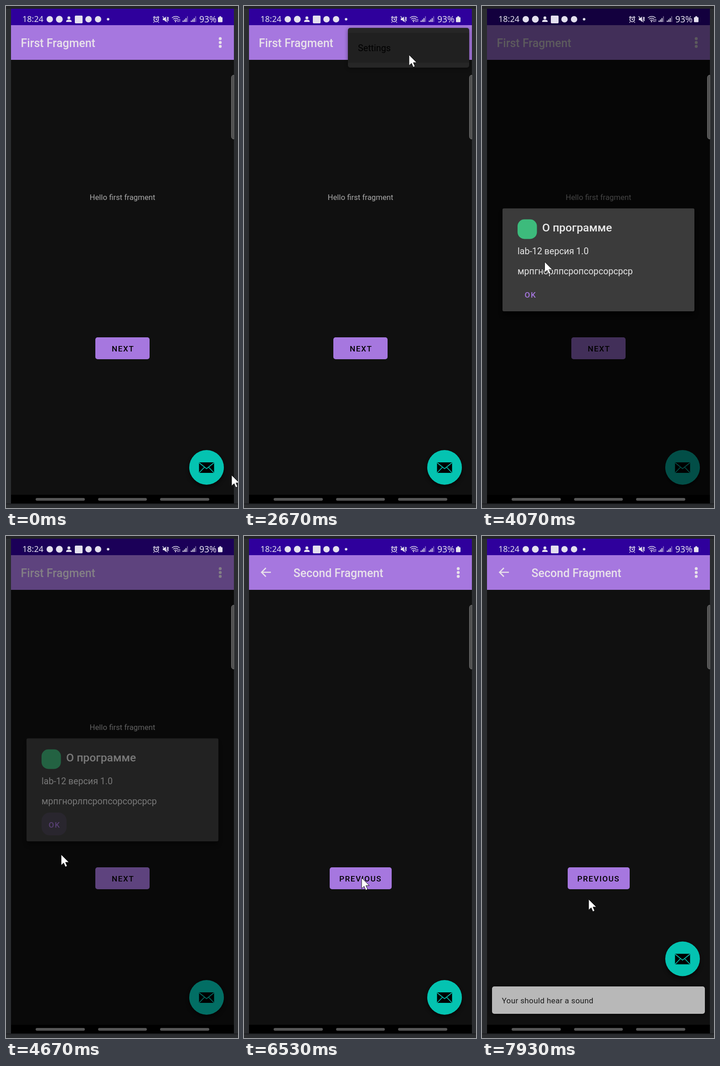
An HTML page that plays this animation: 509x1100 px, repeating every 8 s.

```html
<!DOCTYPE html>
<html lang="en">
<head>
<meta charset="utf-8">
<style>
html, body { margin: 0; width: 100%; height: 100%; overflow: hidden; background: #2b2d30; }
svg { display: block; width: 509px; height: 1100px; font-family: Roboto, sans-serif; }
.bold { font-weight: 500; }
.caps { font-weight: 500; font-size: 17.2px; letter-spacing: .089em; }
.title { font-weight: 500; font-size: 25px; fill: #e8e1ea; }
.body { font-size: 19.65px; fill: #e6e6e6; }
.clock { font-family: "Noto Sans", sans-serif; font-size: 18px; }
</style>
</head>
<body>
<svg viewBox="0 0 509 1100">
  <defs>
    <filter id="soft" x="-30%" y="-30%" width="160%" height="170%"><feGaussianBlur stdDeviation="4"/></filter>
    <clipPath id="fabClip"><circle cx="440" cy="1011" r="38"/></clipPath>
    <clipPath id="nextClip"><rect x="196" y="726" width="119" height="48" rx="5"/></clipPath>
  </defs>
  <rect width="509" height="1100" fill="#2b2d30"/>
  <rect width="509" height="6" fill="#232427"/>
  <rect y="1090" width="509" height="2" fill="#1e1f22"/>
  <rect x="11" y="6" width="489" height="1084" fill="#101010"/>
  <rect x="11" y="6" width="489" height="36" fill="#2f009c"/>
  <rect x="11" y="42" width="489" height="76" fill="#a677df"/>

  <g id="first">
    <text class="title" x="32.5" y="89.500">First Fragment</text>
    <text x="255.500" y="425" text-anchor="middle" font-size="16.800" fill="#a9a9a9">Hello first fragment</text>
    <rect x="196" y="726" width="119" height="48" rx="5" fill="#a677df"/>
    <circle id="nextRipple" cx="258" cy="749" r="0" fill="#000" opacity=".14" clip-path="url(#nextClip)"/>
    <text class="caps" x="232" y="756.500">NEXT</text>
  </g>
  <g id="second">
    <path id="back" d="M59 79.500H39M48 70l-9.500 9.500 9.500 9.500" fill="none" stroke="#e8e1ea" stroke-width="2.600"/>
    <text class="title" x="108.500" y="89.500">Second Fragment</text>
    <rect x="188" y="726" width="136" height="48" rx="5" fill="#a677df"/>
    <text class="caps" x="209" y="756.500">PREVIOUS</text>
  </g>
  <g fill="#e8e1ea">
    <circle cx="470" cy="71.500" r="3.200"/><circle cx="470" cy="80" r="3.200"/><circle cx="470" cy="88.500" r="3.200"/>
  </g>
  <circle id="dotsRipple" cx="469.500" cy="77.500" r="25" fill="#fff"/>

  <g id="snack">
    <rect x="22" y="990" width="467" height="60" rx="5" opacity=".5" filter="url(#soft)"/>
    <rect x="22" y="987" width="467" height="60" rx="5" fill="#b8b8b8"/>
    <text x="43.500" y="1024" font-size="17.200" letter-spacing=".3" fill="#1c1c1c">Your should hear a sound</text>
  </g>
  <g id="fab">
    <circle cx="440" cy="1016" r="38" opacity=".6" filter="url(#soft)"/>
    <circle cx="440" cy="1011" r="38" fill="#04c3b1"/>
    <circle id="fabRipple" cx="440" cy="1011" r="0" fill="#fff" opacity=".22" clip-path="url(#fabClip)"/>
    <rect x="423.500" y="1000" width="33" height="23" rx="1"/>
    <path d="M424 1001l16 13 16-13M424 1022.500l11.500-12M456 1022.500l-11.500-12" fill="none" stroke="#04c3b1" stroke-width="1.700"/>
  </g>
  <rect x="11" y="1071" width="489" height="19"/>

  <g id="menu">
    <rect x="228" y="50" width="266" height="87" rx="5" opacity=".45" filter="url(#soft)"/>
    <rect x="228" y="48" width="266" height="87" rx="5" fill="#262626"/>
    <rect id="row" x="228" y="59" width="266" height="65" fill="#202020"/>
    <text x="250" y="99" font-size="19.700">Settings</text>
  </g>

  <rect id="dim" x="11" y="6" width="489" height="1065"/>
  <g id="dialog">
    <rect x="45" y="452" width="421" height="226" rx="4" opacity=".6" filter="url(#soft)"/>
    <rect x="45" y="443.500" width="421" height="225.500" rx="3" fill="#3b3b3b"/>
    <rect x="78" y="467.500" width="42.500" height="43" rx="15" fill="#3dbb7c"/>
    <text class="bold" x="132" y="494" font-size="24.700" fill="#e9e9e9">О программе</text>
    <text class="body" x="78" y="543.500">lab-12 версия 1.0</text>
    <text class="body" x="78" y="588">мрпгнорлпсропсорсорсрср</text>
    <rect id="okRipple" x="78" y="606" width="55" height="50" rx="18" fill="#a677df"/>
    <text class="caps" x="93.500" y="638.500" font-size="17" fill="#a677df">OK</text>
  </g>

  <g fill="#e4e0ee">
    <text class="clock" x="36" y="35">18:24</text>
    <circle cx="96" cy="29" r="7"/>
    <circle cx="117" cy="29" r="7.500"/>
    <circle cx="138" cy="26" r="3.200"/><path d="M132 35v-1.500q0-3.500 6-3.500t6 3.500V35z"/>
    <rect x="151" y="21" width="17" height="17" rx="2"/>
    <circle cx="181" cy="29" r="7"/>
    <circle cx="202" cy="29" r="7"/>
    <circle cx="224" cy="29" r="2.800"/>
    <g fill="none" stroke="#e4e0ee" stroke-width="1.700">
      <circle cx="329.500" cy="29.500" r="5"/>
      <path d="M329.500 26.500v3.500h2.500M323 25.500l3.500-3M336 25.500l-3.500-3M325 35l-1.500 1.500M334 35l1.500 1.500"/>
      <path d="M343.500 22.500l11 13M353 24l2 2-2 3 2 3M356 24v9" stroke-width="1.400"/>
      <path d="M364 26q8.500-6.500 17 0M366.500 29q6-4.500 11.500 0M369 32q3.500-2.500 6.500 0" stroke-width="1.500"/>
      <path d="M377.500 29v6m-1.500-1.500l1.500 1.500 1.500-1.500M381 35v-6m-1.500 1.500l1.500-1.500 1.500 1.500" stroke-width="1"/>
    </g>
    <path d="M344 27h3l4-4v12l-4-4h-3z"/><circle cx="372" cy="34" r="1.500"/>
    <g id="bars"><path d="M387.500 32h2v3h-2zM390.700 29.500h2V35h-2zM393.900 26.500h2V35h-2z"/><path d="M397.100 22.500h2V35h-2z" opacity=".45"/></g>
    <use href="#bars" x="18"/>
    <text class="clock" x="424" y="35.500" style="font-size:19.200px">93%</text>
    <path d="M468 22.500h4v2h1.500q1.500 0 1.500 1.500v8q0 1.500-1.500 1.500h-7q-1.500 0-1.500-1.500v-8q0-1.500 1.500-1.500h1.500z"/>
  </g>
  <path d="M500 151.500h-1q-4.500 1-4.500 6v128q0 5 4.500 6h1z" fill="#4f4f4f" stroke="#747474"/>
  <g fill="#555">
    <rect x="65" y="1078" width="108" height="6" rx="3"/>
    <rect x="202" y="1078" width="107" height="6" rx="3"/>
    <rect x="338" y="1078" width="108" height="6" rx="3"/>
  </g>
  <path id="cursor" d="M0 0V23.500L5.500 18.500 9.200 27 13.200 25.300 9.500 17H17z" fill="#fff" stroke="#111" stroke-width="1"/>
</svg>
<script>
const $ = id => document.getElementById(id);
const set = (id, name, value) => $(id).setAttribute(name, value);
const fade = (id, value) => set(id, 'opacity', value);
const ramp = (t, a, b) => Math.min(1, Math.max(0, (t - a) / (b - a)));
const ease = u => u * u * (3 - 2 * u);
const move = (t, a, b) => ease(ramp(t, a, b));
const pulse = (t, a, b, c, d) => ramp(t, a, b) * (1 - ramp(t, c, d));
const zoom = (id, s, x, y) => set(id, 'transform', `translate(${x} ${y}) scale(${s}) translate(${-x} ${-y})`);

// Cursor tip: time, x, y
const stops = [
  [70, 495, 1028], [1090, 467, 66], [1900, 467, 66], [2450, 362, 107],
  [3530, 362, 107], [4230, 103, 630], [4500, 103, 630], [4670, 121, 698],
  [5050, 258, 749], [6560, 258, 749], [7130, 437, 1008], [7430, 437, 1008], [7930, 234, 796]
];

function cursorAt(t) {
  let [, x, y] = stops[0];
  for (let i = 1; i < stops.length; i++) {
    const [a, x0, y0] = stops[i - 1], [b, x1, y1] = stops[i];
    if (t < a) break;
    const u = move(t, a, b);
    x = x0 + (x1 - x0) * u;
    y = y0 + (y1 - y0) * u;
  }
  return [x, y];
}

function draw(t) {
  const onSecond = t >= 5700;
  set('first', 'display', onSecond ? 'none' : 'inline');
  set('second', 'display', onSecond ? 'inline' : 'none');
  fade('back', ramp(t, 5700, 5900));

  fade('dotsRipple', .15 * pulse(t, 1200, 1350, 1850, 2050));
  const menu = pulse(t, 1820, 1970, 2700, 2790);
  fade('menu', menu);
  zoom('menu', .8 + .2 * move(t, 1820, 1970), 494, 48);
  fade('row', ramp(t, 2520, 2640));

  const dialog = pulse(t, 2800, 2960, 4570, 4770);
  fade('dialog', dialog);
  zoom('dialog', .92 + .08 * move(t, 2800, 2960), 255, 556);
  fade('dim', .6 * pulse(t, 2800, 2960, 4610, 4830));
  fade('okRipple', .14 * ramp(t, 4270, 4420));

  set('nextRipple', 'r', 80 * move(t, 5480, 5680));
  set('fabRipple', 'r', 40 * move(t, 7200, 7340));
  fade('fabRipple', .22 * (1 - ramp(t, 7400, 7550)));

  const snack = move(t, 7400, 7560);
  fade('snack', snack);
  zoom('snack', .8 + .2 * snack, 255, 1017);
  set('fab', 'transform', `translate(0 ${-84.5 * move(t, 7400, 7580)})`);
  set('cursor', 'transform', `translate(${cursorAt(t)})`);
}

let start;
function tick(now) {
  start ??= now;
  draw((now - start) % 8000);
  requestAnimationFrame(tick);
}
draw(0);
requestAnimationFrame(tick);
</script>
</body>
</html>
```
